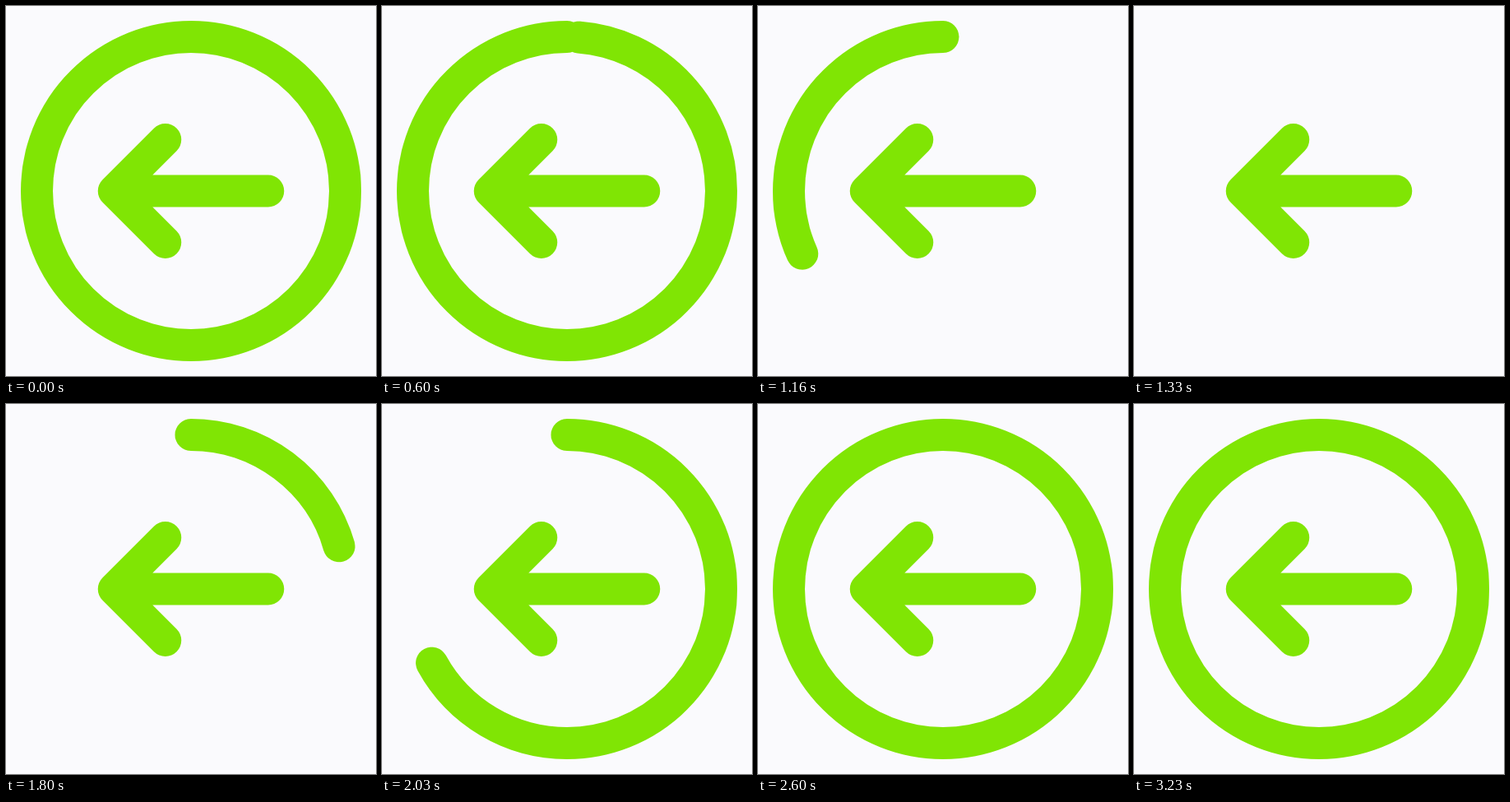
Recreate the animation shown at these times as an HTML page. Size 450x450 px, loop 3.26 s.

```html
<!DOCTYPE html>
<html lang="en">
<head>
<meta charset="utf-8">
<title>Back arrow</title>
<style>
  html, body {
    margin: 0;
    width: 100%;
    height: 100%;
    overflow: hidden;
    background: #fafafd;
  }
  svg {
    display: block;
    width: 100%;
    height: 100%;
    fill: none;
    stroke: #80e504;
    stroke-width: 39;
    stroke-linecap: round;
    stroke-linejoin: round;
  }
  .ring {
    stroke-dasharray: 360 360;
    animation: trim 3260ms linear infinite, blank 3260ms step-end infinite;
  }
  /* Clears clockwise from the top, then draws again the same way. */
  @keyframes trim {
    0% { stroke-dashoffset: 0; }
    16.23% {
      stroke-dashoffset: 0;
      animation-timing-function: cubic-bezier(.333, .01, .667, .39);
    }
    40.06% { stroke-dashoffset: -360; animation-timing-function: step-end; }
    50.4% { stroke-dashoffset: 360; animation-timing-function: ease; }
    80.8%, 100% { stroke-dashoffset: 0; }
  }
  /* Hides the dot that an empty dash with round caps would leave. */
  @keyframes blank {
    0% { opacity: 1; }
    40.06% { opacity: 0; }
    50.4%, 100% { opacity: 1; }
  }
</style>
</head>
<body>
<svg viewBox="0 0 450 450">
  <circle class="ring" cx="225" cy="225" r="187.5" pathLength="360" transform="rotate(-90 225 225)"/>
  <path d="M193.75 162.5L131.25 225L193.75 287.5M131.25 225H318.75"/>
</svg>
</body>
</html>
```
